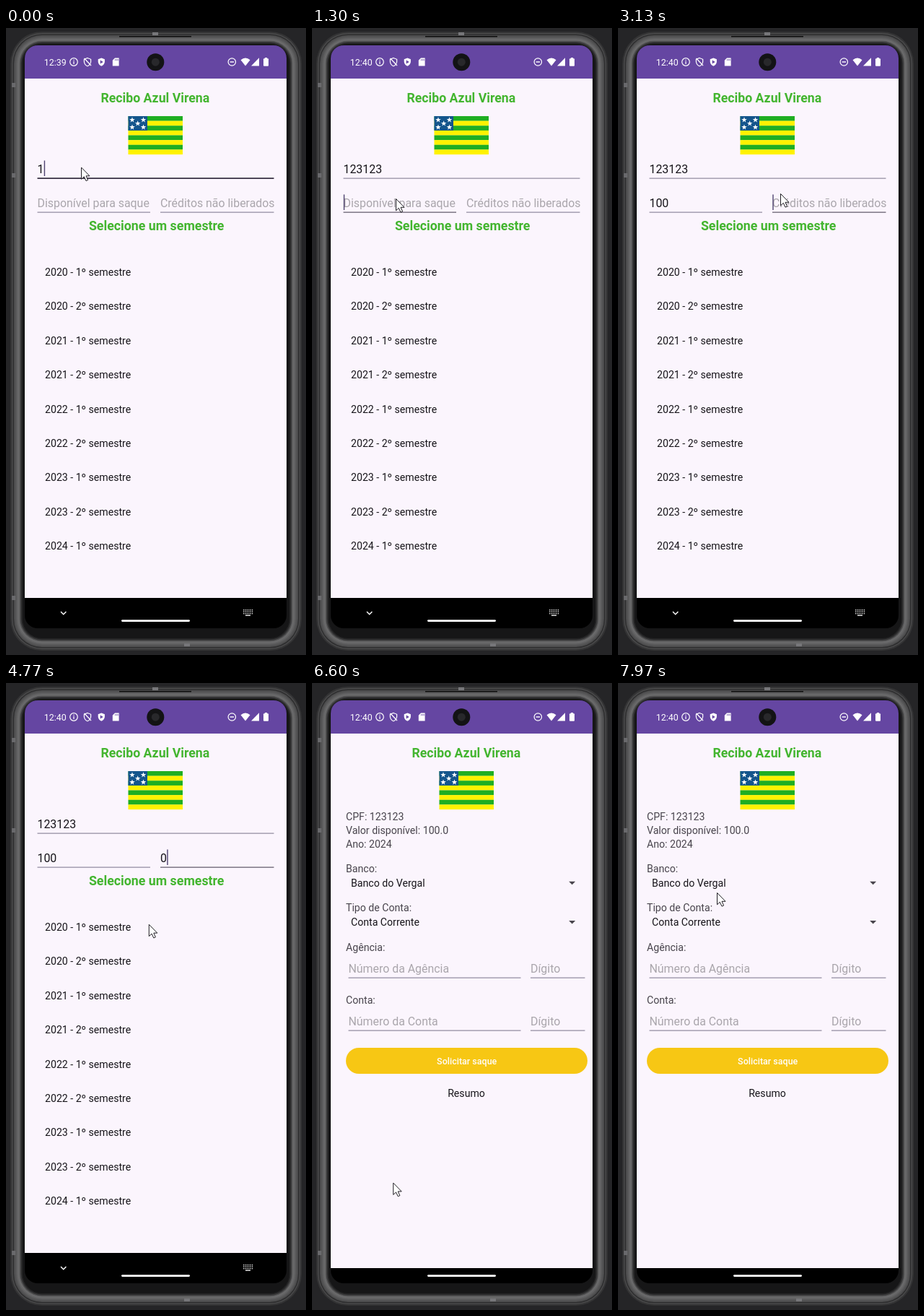
An HTML page with a canvas that plays this animation: 416 px wide and 868 px high, repeating every 8 s.

```html
<!DOCTYPE html>
<html lang="pt">
<head>
<meta charset="utf-8">
<title>Saque</title>
<style>
html, body { margin: 0; width: 100%; height: 100%; overflow: hidden; background: #252527; }
canvas { display: block; width: 416px; height: 868px; }
</style>
</head>
<body>
<canvas id="stage"></canvas>
<script>
const W = 416, H = 868, LOOP = 8000;
const canvas = document.getElementById('stage');
const dpr = window.devicePixelRatio || 1;
canvas.width = W * dpr;
canvas.height = H * dpr;
const c = canvas.getContext('2d');
c.scale(dpr, dpr);

const PAPER = '#fbf5fd', INK = '#17151a', SOFT = '#48444c', HINT = '#aaa6ac';
const GREEN = '#43b52f', LINE = '#79738a', PURPLE = '#6546a2';
const clamp = v => Math.max(0, Math.min(1, v));

function font(size, weight = 400) {
  c.font = `${weight} ${size}px Roboto, sans-serif`;
}
function text(s, x, y, size, color, weight = 400, align = 'left') {
  font(size, weight);
  c.fillStyle = color;
  c.textAlign = align;
  c.fillText(s, x, y);
}
function rect(x, y, w, h, color) {
  c.fillStyle = color;
  c.fillRect(x, y, w, h);
}
function round(x, y, w, h, r) {
  c.beginPath();
  c.roundRect(x, y, w, h, r);
}
function poly(points, color) {
  c.beginPath();
  points.forEach(([x, y]) => c.lineTo(x, y));
  c.closePath();
  c.fillStyle = color;
  c.fill();
}
function strokePath(d, color, width) {
  c.strokeStyle = color;
  c.lineWidth = width;
  c.stroke(new Path2D(d));
}

// Nested rounded bodies, each a step further in: [inset, grey]
const shell = [
  [6, 52], [8, 74], [9.5, 46], [11, 78], [13, 88], [15, 100],
  [17, 108], [18.5, 84], [20, 56], [21.5, 36], [23, 22]
];
function phone() {
  rect(0, 0, W, H, '#252527');
  for (const [y, h] of [[258, 49], [367, 105]]) {
    round(405, y, 5, h, 2);
    c.fillStyle = '#5c5c5e';
    c.fill();
  }
  for (const [i, grey] of shell) {
    round(i, i - 1, W - 2 * i, H + 1 - 2 * i, 50 - i);
    c.fillStyle = `rgb(${grey}, ${grey}, ${grey + 1})`;
    c.fill();
  }
  rect(203, 6, 8, 4, '#77777a');
  rect(247, 852, 8, 4, '#77777a');
  for (const y of [76, 201, 786]) rect(8, y, 5, 6, '#69696c');
  rect(157, 11, 100, 1.5, '#0c0c0c');
}

function shield(x, y) {
  c.beginPath();
  c.moveTo(x, y - 5.5);
  c.lineTo(x + 4.6, y - 3.7);
  c.lineTo(x + 4.6, y);
  c.quadraticCurveTo(x + 4, y + 4, x, y + 5.8);
  c.quadraticCurveTo(x - 4, y + 4, x - 4.6, y);
  c.lineTo(x - 4.6, y - 3.7);
  c.closePath();
}
function ring(x, y, r) {
  c.beginPath();
  c.arc(x, y, r, 0, 7);
  c.strokeStyle = '#fff';
  c.lineWidth = 1.2;
  c.stroke();
}

function statusBar(t) {
  const white = '#fff';
  rect(26, 24, 363, 46, PURPLE);
  text(t < 200 ? '12:39' : '12:40', 52.8, 51.5, 12.4, white);
  ring(94, 47, 5.3);
  rect(93.4, 46, 1.2, 4, white);
  rect(93.4, 43.8, 1.2, 1.3, white);
  shield(113, 47);
  c.strokeStyle = white;
  c.stroke();
  strokePath('M108.5 42L118 52', white, 1.2);
  shield(132.3, 47);
  c.fillStyle = white;
  c.fill();
  poly([[130.7, 44.6], [130.7, 49.4], [134.8, 47]], PURPLE);
  poly([[151, 41.5], [156.6, 41.5], [156.6, 52.5], [147.8, 52.5], [147.8, 44.7]], white);
  for (const x of [151.2, 153, 154.8]) rect(x, 43, 0.8, 2.2, PURPLE);
  ring(313.3, 47, 5.2);
  rect(310.6, 46.3, 5.4, 1.4, white);
  c.beginPath();
  c.moveTo(332, 52.5);
  c.lineTo(325.5, 44.2);
  c.quadraticCurveTo(332, 38.8, 338.5, 44.2);
  c.closePath();
  c.fill();
  poly([[351, 41.3], [351, 52.5], [340, 52.5]], white);
  round(357, 42.2, 7, 10.5, 1);
  c.fill();
  rect(358.9, 41, 3.2, 2, white);
  c.beginPath();
  c.arc(207.3, 47.2, 12, 0, 7);
  c.fillStyle = '#131315';
  c.fill();
  c.beginPath();
  c.arc(207.3, 47.2, 5.5, 0, 7);
  c.fillStyle = '#28282b';
  c.fill();
}

function star(x, y) {
  const pts = [];
  for (let i = 0; i < 10; i++) {
    const r = i % 2 ? 1.6 : 4, a = i * Math.PI / 5 - Math.PI / 2;
    pts.push([x + r * Math.cos(a), y + r * Math.sin(a)]);
  }
  poly(pts, '#fff');
}
function header() {
  text('Recibo Azul Virena', 206.8, 103, 17.7, GREEN, 700, 'center');
  const step = 53 / 8;
  for (let i = 0; i < 8; i++) rect(169.5, 122 + i * step, 75.5, step + 0.1, i % 2 ? '#fff200' : '#1fae22');
  rect(169.5, 122, 26.5, 3 * step, '#14558c');
  for (const [x, y] of [[175, 127.2], [190.5, 127.2], [182.7, 132.2], [175, 137.4], [190.5, 137.4]]) star(x, y);
}

// value: typed text, hint shown while empty
function field(x, w, y, value, hint, focus, caret, thick = 1) {
  text(value || hint, x, y, 15.9, value ? INK : HINT);
  rect(x, y + 7.6 - thick / 2, w, thick, focus ? '#3c3548' : LINE);
  if (caret) {
    font(15.9);
    rect(x + c.measureText(value).width + 0.3, y - 17, 1.4, 21.5, '#4f4370');
  }
}
const typed = (s, times, t) => s.slice(0, times.filter(at => t >= at).length);

function formPage(t) {
  rect(0, 70, W, 719, PAPER);
  rect(0, 789, W, 45, '#000');
  header();
  const active = t < 1240 ? 1 : t < 2960 ? 2 : 3;
  const hidden = (t >= 2630 && t < 2960) || (t >= 4800 && t < 5300) || t >= 5930;
  const caret = n => active === n && !hidden;
  field(43.5, 328, 200.5, typed('123123', [0, 170, 330, 550, 700, 900], t), '', active === 1, caret(1), active === 1 ? 1.8 : 1);
  field(43.5, 156.5, 247.5, typed('100', [1700, 1900, 2070], t), 'Disponível para saque', active === 2, caret(2));
  field(214, 157.5, 247.5, typed('0', [4300], t), 'Créditos não liberados', active === 3, caret(3));
  text('Selecione um semestre', 208.7, 280, 17.8, GREEN, 700, 'center');
  for (let i = 0; i < 9; i++) {
    text(`${2020 + (i >> 1)} - ${i % 2 + 1}º semestre`, 54, 343 + i * 47.4, 14.13, INK);
  }
  strokePath('M76 808L79.7 811.8L83.4 808', '#fff', 1.4);
  for (let r = 0; r < 3; r++) {
    for (let k = 0; k < 6; k++) rect(329 + k * 2.4, 805 + r * 2.5, 1.2, 1.3, '#fff');
  }
  rect(332, 812.5, 7, 1.3, '#fff');
}

function spinner(label, value, y) {
  text(label, 40, y, 14.13, SOFT);
  text(value, 47, y + 20, 14.13, INK);
  poly([[349.2, y + 12.8], [358.2, y + 12.8], [353.7, y + 17.3]], SOFT);
}
function account(label, hint, y) {
  text(label, 40, y, 14.13, SOFT);
  field(43.5, 239, y + 29.5, '', hint);
  field(296, 75.5, y + 29.5, '', 'Dígito');
}
function withdrawPage() {
  rect(0, 70, W, 740, PAPER);
  rect(0, 810, W, 24, '#000');
  header();
  ['CPF: 123123', 'Valor disponível: 100.0', 'Ano: 2024'].forEach((s, i) => text(s, 40, 190 + i * 19.2, 14.13, SOFT));
  spinner('Banco:', 'Banco do Vergal', 262);
  spinner('Tipo de Conta:', 'Conta Corrente', 316.3);
  account('Agência:', 'Número da Agência', 371);
  account('Conta:', 'Número da Conta', 444);
  round(40, 505, 335, 36, 18);
  c.fillStyle = '#f7c714';
  c.fill();
  text('Solicitar saque', 207.7, 527.6, 12.5, '#fffdfa', 500, 'center');
  text('Resumo', 207, 573, 14.13, INK, 400, 'center');
}

// Slow start, quick middle, long settle
const bez = (p, u) => {
  const v = 1 - u;
  return v * v * v * p[0] + 3 * v * v * u * p[1] + 3 * v * u * u * p[2] + u * u * u * p[3];
};
function emphasized(p) {
  const early = p < 1 / 6;
  const xs = early ? [0, 0.05, 0.133333, 1 / 6] : [1 / 6, 0.208333, 0.25, 1];
  const ys = early ? [0, 0, 0.06, 0.4] : [0.4, 0.82, 1, 1];
  let lo = 0, hi = 1;
  for (let i = 0; i < 24; i++) {
    const mid = (lo + hi) / 2;
    if (bez(xs, mid) < p) lo = mid; else hi = mid;
  }
  return bez(ys, lo);
}

function pages(t) {
  const since = t - 6440, slide = 36.3;
  const e = emphasized(clamp(since / 600));
  const shifted = (dx, alpha, draw) => {
    c.save();
    c.globalAlpha = alpha;
    c.translate(Math.round(dx), 0);
    draw(t);
    c.restore();
  };
  if (since < 150) shifted(-slide * e, 1, formPage);
  if (since > 50) shifted(slide * (1 - e), clamp((since - 50) / 100), withdrawPage);
}

// time, x, y
const route = [
  [0, 104, 192.5], [400, 107, 200], [880, 107, 200], [1030, 116, 236], [1870, 116, 236],
  [2130, 196, 240], [2400, 281, 236], [2630, 281, 236], [2920, 225, 229], [3610, 225, 229],
  [3640, 225, 233], [4400, 225, 233], [4770, 198, 333], [4950, 160, 480], [5100, 146, 605],
  [5300, 150, 665], [5470, 161, 696], [5680, 161, 696], [5710, 128, 712], [5930, 128, 712],
  [6030, 106, 692], [6480, 106, 692], [6790, 122, 691], [7260, 122, 689], [7420, 200, 600],
  [7600, 266, 455], [7800, 215, 335], [7960, 137, 290], [8000, 137, 290]
];
function pointer(t) {
  const i = route.findIndex(r => r[0] > t);
  const [t0, x0, y0] = route[i - 1], [t1, x1, y1] = route[i];
  const k = (t - t0) / (t1 - t0);
  c.save();
  c.translate(x0 + (x1 - x0) * k + 0.5, y0 + (y1 - y0) * k + 0.5);
  const arrow = new Path2D('M0 0V16.3L3.8 12.8L6.5 18.6L9.1 17.5L6.5 11.8H11.5Z');
  c.fillStyle = '#fff';
  c.fill(arrow);
  c.strokeStyle = '#201e24';
  c.lineWidth = 1;
  c.stroke(arrow);
  c.restore();
}

function frame(now) {
  const t = now % LOOP;
  phone();
  c.save();
  round(26, 24, 363, 807, 18);
  c.clip();
  pages(t);
  statusBar(t);
  round(160, 819.2, 95, 2.8, 1.4);
  c.fillStyle = '#fff';
  c.fill();
  c.restore();
  pointer(t);
}

const start = performance.now();
function tick() {
  frame(performance.now() - start);
  requestAnimationFrame(tick);
}
tick();
</script>
</body>
</html>
```
